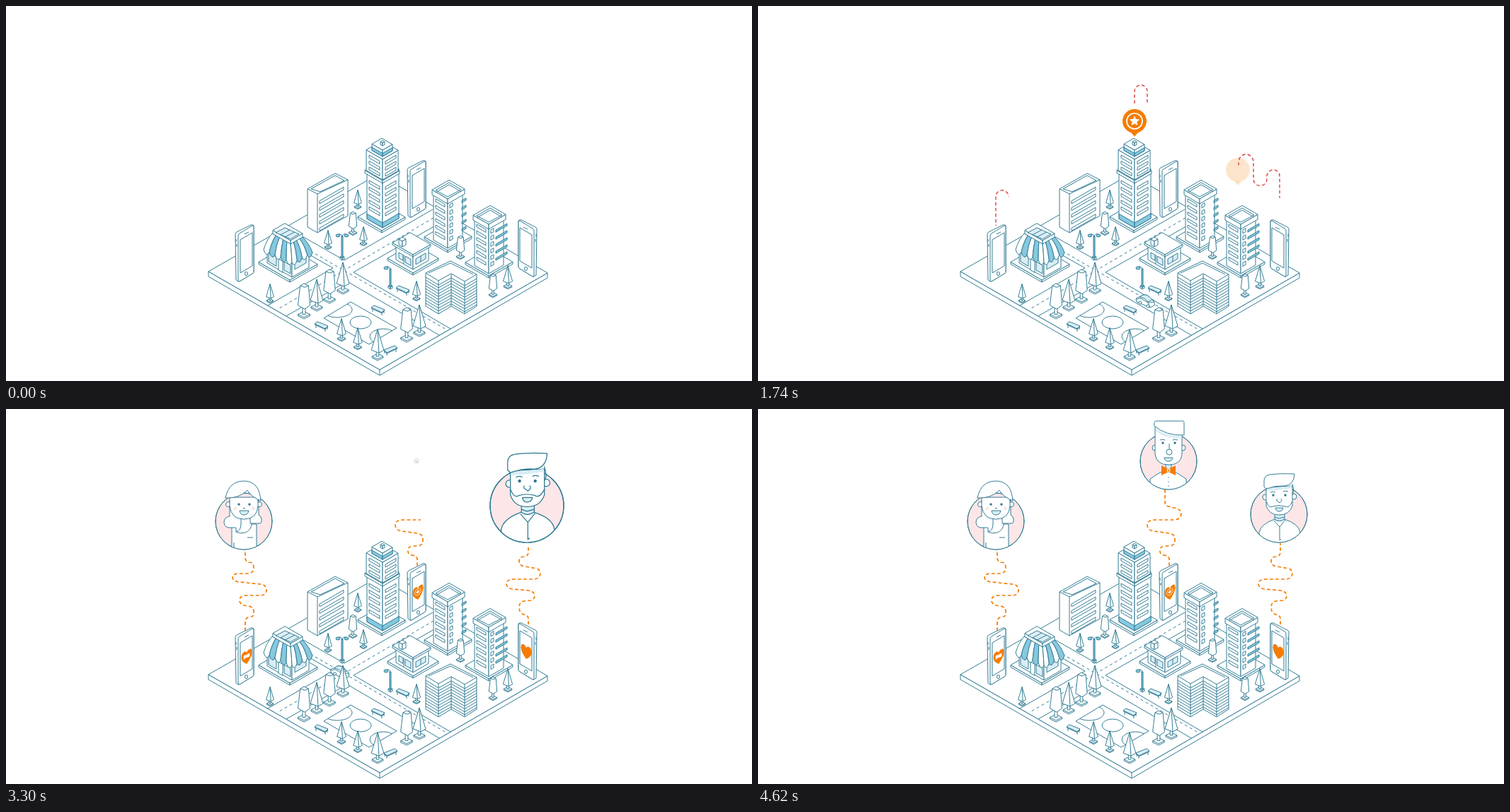
An HTML page with a canvas that plays this animation: 1054x531 px, repeating every 4680 ms.

```html
<!DOCTYPE html>
<html lang="en">
<head>
<meta charset="utf-8">
<title>Isometric city</title>
<style>
html, body { margin: 0; width: 100%; height: 100%; overflow: hidden; background: #fff; }
canvas { display: block; }
</style>
</head>
<body>
<canvas id="stage" width="1054" height="531"></canvas>
<script>
const ctx = document.getElementById('stage').getContext('2d');
const LOOP = 4680, K = 0.577, THIN = 0.95;
const INK = '#2b7890', BLUE = '#86c8de', PALE = '#d9edf5', PINK = '#fde6e7';
const ORANGE = '#f57c00', RED = '#d8433f';

// ---------- drawing helpers ----------
function trace(pts) {
  ctx.beginPath();
  for (let i = 0; i < pts.length; i += 2) ctx.lineTo(pts[i], pts[i + 1]);
}
function poly(pts, fill = '#fff') {
  trace(pts);
  ctx.closePath();
  ctx.fillStyle = fill;
  ctx.fill();
  ctx.stroke();
}
function line(...pts) { trace(pts); ctx.stroke(); }
function shape(d, fill, stroke = true) {
  const p = new Path2D(d);
  if (fill) { ctx.fillStyle = fill; ctx.fill(p); }
  if (stroke) ctx.stroke(p);
}
function disc(x, y, rx, fill, stroke = true, ry = rx) {
  ctx.beginPath();
  ctx.ellipse(x, y, rx, ry, 0, 0, 7);
  if (fill) { ctx.fillStyle = fill; ctx.fill(); }
  if (stroke) ctx.stroke();
}
// Box standing on its front corner, l to the left and r to the right.
function slab(x, y, l, r, h, fill) {
  const t = y - h;
  poly([x, y, x - l, y - l * K, x - l, t - l * K, x, t], fill);
  poly([x, y, x + r, y - r * K, x + r, t - r * K, x, t], fill);
  poly([x, t, x - l, t - l * K, x - l + r, t - (l + r) * K, x + r, t - r * K]);
}
function strip(x, y, w, h, k, fill) {
  poly([x, y, x + w, y + w * k, x + w, y + w * k + h, x, y + h], fill);
}
function rows(n, step, x, y, w, h, k, fill) {
  for (let i = 0; i < n; i++) strip(x, y + i * step, w, h, k, fill);
}
function at(x, y, s, draw) {
  ctx.save();
  ctx.translate(x, y);
  ctx.scale(s, s);
  draw();
  ctx.restore();
}

// ---------- ground ----------
function ground() {
  poly([286, 376, 528, 515, 765, 378, 765, 385, 528, 523, 286, 383]);
  poly([286, 376, 526, 238, 765, 378, 528, 515]);
  line(528, 515, 528, 523);
  line(420, 327, 478, 360, 603, 288);
  line(605, 312, 491, 377, 628, 457);
  line(370, 424, 462, 371, 425, 350);
  line(396, 439, 482, 390, 612, 466);
  ctx.setLineDash([4, 4]);
  line(604, 300, 383, 430);
  line(430, 347, 620, 457);
  ctx.setLineDash([]);

  const court = [449, 442, 487, 419, 552, 456, 513, 479];
  poly(court);
  disc(501, 448, 15, null, true, 9);
  ctx.save();
  trace(court);
  ctx.clip();
  disc(468, 430, 21, null, true, 11);
  disc(533, 468, 19, null, true, 11);
  ctx.restore();
}

function car(t) {
  ctx.save();
  ctx.globalAlpha = Math.min(1, t / 300);
  ctx.translate(547 - 0.0484 * (t - 1740), 418 - 0.0289 * (t - 1740));
  shape('M-13 -3Q-12 -6 -8 -6L-3 -9Q1 -10 5 -7L10 -2L13 1V6L7 9L-12 1Z', '#fff');
  shape('M-8 -6L-3 -9Q1 -10 5 -7L10 -2L4 1L-1 -4Z', PALE);
  line(-13, -3, -6, -4, 4, 2, 7, 9);
  line(4, 2, 13, 1);
  disc(-7, 2, 2, '#fff');
  disc(4, 7, 2, '#fff');
  ctx.restore();
}

// ---------- buildings ----------
function office() {
  poly([426, 259, 465, 237, 483, 246, 483, 297, 440, 321, 426, 313]);
  line(426, 259, 440, 266, 483, 246);
  line(440, 266, 440, 321);
  poly([431, 259, 465, 240, 478, 247, 444, 263]);
  rows(5, 9.6, 443, 276, 34, 4, -K);
}

function tower() {
  slab(531, 321, 34, 33, 3);
  slab(532, 314, 22, 23, 70);
  strip(510, 294.3, 22, 7, K, BLUE);
  strip(532, 307, 23, 7, -K, BLUE);
  rows(5, 9.3, 513, 247, 15, 4, K);
  rows(5, 9.3, 536, 256, 15, 4, -K);
  slab(532, 251, 25, 24, 4);
  slab(532, 246, 23, 22, 29);
  rows(3, 8.5, 513, 211, 15, 4, K);
  rows(3, 8.5, 536, 220, 15, 4, -K);
  slab(532, 213, 15, 14, 9);
  strip(517, 200, 15, 4.5, K, BLUE);
  strip(532, 208.6, 14, 4.5, -K, BLUE);
  slab(532, 198, 3, 3, 4);
}

function flats(x, y, inset, wide) {
  slab(x, y + 6, 33, 34, 3);
  slab(x, y, 20, 21, 66);
  rows(6, 9.3, x - 17, y - 70, 13, 4, K);
  rows(6, 9.3, x + 3, y - 62, 4, 5, -K);
  for (let i = 0; i < 5; i++) {
    strip(x + inset, y - 56 - inset * K + i * 10, wide, 3, -K, BLUE);
  }
  slab(x, y - 63, 22, 24, 7);
  poly([x - 17, y - 82, x + 2, y - 93, x + 19, y - 83, x, y - 73]);
  line(x - 17, y - 79, x + 2, y - 90, x + 19, y - 80);
}

function corner() {
  const top = [593, 378, 611, 389, 629, 379, 648, 390, 665, 380];
  poly([593, 378, 628, 361, 665, 380, 665, 425, 648, 436, 629, 425, 611, 436, 593, 425]);
  line(...top);
  line(597, 378, 628, 364, 660, 380);
  for (let i = 0; i < 5; i++) {
    for (const d of [6, 10]) line(...top.map((v, j) => j % 2 ? v + i * 8.2 + d : v));
  }
  line(611, 389, 611, 436);
  line(629, 379, 629, 425);
  line(648, 390, 648, 436);
}

function house() {
  slab(575, 381, 36, 36, 3);
  slab(575, 373, 24, 22, 20);
  strip(555, 349, 6, 8, K, PALE);
  strip(564, 354, 8, 9, K, PALE);
  strip(579, 358, 14, 8, -K, PALE);
  line(562, 352, 562, 365);
  line(586, 354, 586, 362);
  slab(575, 355, 29, 25, 3);
  slab(560, 341, 5, 5, 8);
}

// Striped cloth from the edge a-b down to the wider edge c-d.
function awning(n, a, b, c, d) {
  const mix = (p, q, u) => [p[0] + (q[0] - p[0]) * u, p[1] + (q[1] - p[1]) * u];
  const bend = (p, q) => [p[0] + (q[0] - p[0]) * 0.65, p[1] + (q[1] - p[1]) * 0.4];
  for (let i = 0; i < n; i++) {
    const p = mix(a, b, i / n), q = mix(a, b, (i + 1) / n);
    const r = mix(c, d, i / n), s = mix(c, d, (i + 1) / n);
    const low = mix(r, s, 0.5);
    shape(`M${p}L${q}Q${bend(q, s)} ${s}Q${low[0]} ${low[1] + 10} ${r}Q${bend(p, r)} ${p}Z`,
      i % 2 ? BLUE : '#fff');
  }
}
function shop() {
  slab(401, 391, 44, 39, 3);
  slab(404, 384, 35, 24, 26);
  strip(371, 349, 11, 13, K, PALE);
  strip(385, 358, 6, 16, K);
  strip(393, 362, 9, 12, K, PALE);
  strip(408, 364, 16, 9, -K, PALE);
  awning(5, [376, 322], [402, 336], [364, 345], [404, 363]);
  awning(4, [402, 336], [419, 327], [404, 363], [433, 349]);
  slab(402, 337, 25, 17, 5);
  poly([381, 321, 394, 314, 414, 323, 402, 330], PALE);
  line(388, 324, 401, 317);
  line(394, 327, 408, 320);
}

// ---------- small things ----------
function tree(x, y, h, round) {
  const s = h / 45;
  at(x, y, s, () => {
    ctx.lineWidth = THIN / s;
    poly([-8, -5, 0, -9, 8, -5, 8, -3, 0, 1, -8, -3]);
    line(-8, -5, 0, -1, 8, -5);
    poly([-1.8, -14, 1.8, -14, 1.8, -5, -1.8, -5]);
    if (round) {
      poly([-5, -43, 0, -46, 6, -43, 8, -17, 1, -12, -8, -17]);
      line(-5, -43, 1, -41, 6, -43);
    } else {
      poly([0, -44, 9, -14, 2, -10, -9, -14]);
      line(0, -44, 2, -10);
    }
  });
}
function bench(x, y) {
  at(x, y, 1, () => {
    line(-7, -1, -7, 3);
    line(6, 4, 6, 8);
    line(9, 1, 9, 5);
    poly([-9, -3, -5, -6, 10, 0, 6, 4], PALE);
    line(-9, -2, 6, 5, 10, 1);
  });
}
function lamp(x, y, h, double) {
  const top = y - h;
  slab(x, y, 3, 3, 3);
  poly([x - 1, y - 3, x - 1, top + 4, x + 1, top + 4, x + 1, y - 3], BLUE);
  const head = s => {
    shape(`M${x} ${top + 5}Q${x + s} ${top} ${x + 5 * s} ${top + 1}`);
    disc(x + 6 * s, top + 3, 3, BLUE, true, 2);
  };
  head(-1);
  if (double) head(1);
}
function phone(x, y, flip) {
  ctx.save();
  ctx.translate(x, y);
  ctx.scale(flip ? -1 : 1, 1);
  shape('M-16 -27Q-16 -29 -14 -30L6 -40Q8 -41 10 -39V26Q10 28 8 29L-10 40Q-12 41 -15 38Z', '#fff');
  shape('M-12 -25Q-12 -27 -10 -28L8 -39Q10 -40 10 -37V26Q10 28 8 29L-10 40Q-12 41 -12 38Z', '#fff');
  poly([-9, -19, 8, -29, 8, 18, -9, 28]);
  line(-3, -27, 3, -30);
  disc(-0.5, 29, 2, null, true, 2.7);
  line(-15, -20, -15, -16);
  line(-14, -13, -14, -9);
  ctx.restore();
}

const ROUND = [[490, 324, 32], [642, 358, 32], [457, 420, 46], [421, 442, 48],
  [688, 412, 32], [566, 475, 47]];
const CONES = [[497, 287, 27], [505, 339, 27], [455, 344, 27], [476, 407, 45], [439, 431, 45],
  [373, 420, 27], [580, 417, 28], [709, 400, 33], [474, 474, 32], [497, 486, 31],
  [584, 467, 45], [525, 501, 44]];

function city() {
  office();
  tower();
  phone(583, 259);
  flats(624, 343, 20, 6);
  flats(682, 379, 10, 16);
  phone(734, 343, true);
  phone(340, 350);
  shop();
  house();
  corner();
  lamp(475, 360, 38, true);
  lamp(543, 401, 33, false);
  bench(560, 402);
  bench(525, 430);
  bench(445, 453);
  for (const [x, y, h] of ROUND) tree(x, y, h, true);
  for (const [x, y, h] of CONES) tree(x, y, h, false);
  ctx.save();
  ctx.translate(544, 487);
  ctx.scale(-1, 1);
  bench(0, 0);
  ctx.restore();
}

// ---------- icons ----------
function ticket() {
  shape('M-11 -6H-2Q0 -3 2 -6H11V-2Q9 0 11 2V6H2Q0 3 -2 6H-11V2Q-9 0 -11 -2Z', '#fff', false);
  ctx.strokeStyle = ORANGE;
  ctx.setLineDash([2, 1.5]);
  line(-4, -6, -4, 6);
  ctx.setLineDash([]);
}
function badge() {
  ctx.strokeStyle = '#fff';
  ctx.lineWidth = 1.7;
  disc(0, 0, 11);
  ctx.beginPath();
  for (let i = 0; i < 10; i++) {
    const r = i % 2 ? 3.6 : 7.6, a = i * Math.PI / 5;
    ctx.lineTo(r * Math.sin(a), -r * Math.cos(a));
  }
  ctx.fillStyle = '#fff';
  ctx.fill();
}
const blank = () => {};

// ---------- avatars ----------
function eyes(x, y) {
  disc(-x, y, 1.7, INK, false);
  disc(x + 1, y, 1.7, INK, false);
}
function bust(body, head) {
  disc(0, 0, 40, PINK);
  ctx.save();
  ctx.beginPath();
  ctx.arc(0, 0, 40, 0, 7);
  ctx.clip();
  body();
  ctx.restore();
  disc(0, 0, 40);
  head();
}
function woman() {
  bust(() => {
    shape('M-17 44V4H18V44Z', '#fff');
    line(-14, 30, -14, 40);
    line(5, 23, 13, 23);
  }, () => {
    shape('M-11 15Q-5 18 2 16Q10 13 11 4L8 -8H-10', '#fff');
    shape('M-20 -30V-7Q-28 -6 -28 2Q-27 10 -18 9H-11V15Q-4 13 -4 4V-8Z', '#fff');
    shape('M9 -8V3H23Q26 2 25 -3Q25 -7 21 -9V-30Z', '#fff');
    disc(-22, -24, 3.5, '#fff');
    disc(22, -24, 3.5, '#fff');
    shape('M-20 -34V-22Q-18 -3 0 -3Q19 -3 20 -22V-34Z', '#fff');
    shape('M-26 -33Q-21 -57 0 -57Q22 -57 24 -29Q10 -35 5 -44Q-7 -32 -26 -33Z', '#fff');
    eyes(7, -24);
    disc(-12, -18, 2.5, PINK, false);
    disc(13, -18, 2.5, PINK, false);
    line(-1, -18.5, 2, -18.5);
    shape('M-6 -15H7Q6 -9 0 -9Q-5 -9 -6 -15Z', PALE);
  });
}
function bearded() {
  bust(() => {
    shape('M-28 44V26Q-26 14 -6 7Q0 12 7 7Q28 13 30 26V44Z', '#fff');
    line(-7, 9, 1, 18, 9, 8);
    line(1, 18, 1, 37, 3, 35);
  }, () => {
    shape('M-6 -2V7Q0 12 8 7V-2Z', PALE);
    line(-6, 4, 0, 6, 8, 4);
    disc(-19, -24, 4, '#fff');
    disc(21, -25, 4, '#fff');
    shape('M-18 -38V-12Q-14 1 0 1Q15 1 19 -12V-40Z', '#fff');
    shape('M-17 -37Q0 -38 18 -40V-37Q0 -34 -17 -33Z', PALE, false);
    shape('M-18 -18Q-14 -8 -9 -11Q0 -14 9 -11Q14 -8 19 -18');
    shape('M-21 -39V-47Q-21 -55 -13 -56Q0 -58 22 -57Q21 -41 8 -40Q-4 -41 -18 -36Z', '#fff');
    line(19, -43, 21, -33, 19, -27);
    eyes(8, -27);
    shape('M-12 -31Q-8 -33 -5 -31M6 -32Q9 -34 13 -32');
    shape('M-3 -22Q-4 -18 -1 -18L1 -16L3 -18Q5 -19 3 -22');
    shape('M-5 -9H6Q5 -4 0 -4Q-4 -4 -5 -9Z', PALE);
  });
}
function dapper() {
  bust(() => {
    shape('M-26 44V25Q-12 15 -4 13H4Q14 17 25 25V44Z', '#fff');
    for (const y of [23, 29, 35]) disc(0, y, 0.7, INK, false);
  }, () => {
    shape('M-4 2V15H4V2Z', PALE);
    disc(-19, -19, 4, '#fff');
    disc(20, -19, 4, '#fff');
    shape('M-19 -52V-10Q-17 5 0 5Q18 5 19 -10V-44Z', '#fff');
    shape('M-18 -46Q-4 -35 19 -36V-33Q-6 -32 -18 -43Z', PALE, false);
    shape('M-20 -52Q-21 -57 -17 -57H19Q22 -58 22 -54V-37Q-4 -36 -20 -50Z', '#fff');
    eyes(8, -26);
    shape('M-12 -30Q-8 -32 -5 -30M6 -30Q9 -32 13 -30');
    line(1, -25, 1, -17);
    disc(1, -13, 4, '#fff');
    shape('M-6 -5H6Q5 0 0 0Q-5 0 -6 -5Z', PALE);
    shape('M0 11L-10 6V20L0 15L10 20V6Z', ORANGE, false);
    disc(0, 13, 2.5, '#fff', false);
    disc(0, 13, 1.5, ORANGE, false);
  });
}

// ---------- motion ----------
const clamp = v => Math.max(0, Math.min(1, v));
const easeOut = v => 1 - Math.pow(1 - clamp(v), 1.8);
function pop(d) {
  if (d <= 0) return 0;
  if (d < 300) return 1.3 * (1 - Math.pow(1 - d / 300, 3.2));
  const p = clamp((d - 300) / 200);
  return 1.3 - 0.3 * p * p * (3 - 2 * p);
}

function route(d) {
  const el = document.createElementNS('http://www.w3.org/2000/svg', 'path');
  el.setAttribute('d', d);
  return { path: new Path2D(d), len: el.getTotalLength() };
}
// Strokes the part of a dashed route between the fractions a and b.
function trail({ path, len }, a, b, color, width) {
  if (b <= a) return;
  const dash = [0];
  let pos = 0;
  for (let s = 0; s < len; s += 8) {
    const lo = Math.max(s, a * len), hi = Math.min(s + 4.8, b * len);
    if (hi <= lo) continue;
    dash.push(lo - pos, hi - lo);
    pos = hi;
  }
  if (dash.length < 2) return;
  dash.push(len * 2);
  ctx.save();
  ctx.strokeStyle = color;
  ctx.lineWidth = width;
  ctx.setLineDash(dash);
  ctx.stroke(path);
  ctx.restore();
}

const OFFERS = [
  { tip: [394, 312], heart: [340, 350], born: 330, go: 1000, icon: ticket,
    way: route('M395 268V254A14 15 0 0 0 367 254V272A6.5 7 0 0 1 354 272V270A9 9 0 0 0 336 270V311') },
  { tip: [678, 282], heart: [735, 343], born: 460, go: 1300, icon: blank, flip: true,
    way: route('M679 234V221A10.5 11 0 0 1 700 221V245A9.5 9.5 0 0 0 719 245V241A9 9 0 0 1 737 241V304') },
  { tip: [532, 185], heart: [582, 259], born: 590, go: 1600, icon: badge,
    way: route('M532 138V121A9 9 0 0 1 550 121V150A7.5 7.5 0 0 0 565 150A7.5 7.5 0 0 1 580 150V221') }
];
const PEOPLE = [
  { x: 336, y: 159, base: 40, go: 2345, born: 2700, draw: woman,
    way: route('M338 314V302Q338 295 344 295Q351 294 350 287Q350 280 342 279Q330 278 330 271' +
      'Q330 265 338 264H359Q368 264 368 256Q368 249 359 248L330 245Q320 244 320 238' +
      'Q321 233 329 233H343Q350 232 350 225Q350 217 344 217Q338 216 338 211V199') },
  { x: 736, y: 149, base: 40, go: 2690, born: 3000, draw: bearded,
    way: route('M738 305V297Q738 292 732 291Q725 289 725 281Q725 273 732 272L741 271Q747 270 747 264' +
      'Q746 258 738 257L716 255Q707 254 707 247Q708 241 717 241H746Q755 240 755 232' +
      'Q754 226 745 225L733 223Q725 222 725 215Q726 209 732 209Q738 208 738 203V190') },
  { x: 580, y: 74, base: 0, go: 2970, born: 3294, draw: dapper,
    way: route('M581 222V213Q581 208 574 207Q567 206 568 200Q568 194 576 194H582Q589 193 589 185' +
      'Q589 177 581 176L560 173Q550 172 550 164Q551 157 560 157H588Q598 156 598 148' +
      'Q597 141 588 140L580 138Q575 137 575 131V113') }
];

function offer(o, t) {
  const d = t - o.go, leave = clamp((d - 280) / 200);
  const size = pop(t - o.born);
  if (size && leave < 1) {
    ctx.save();
    ctx.globalAlpha = 1 - leave;
    at(o.tip[0], o.tip[1] - 35 * leave, size, () => {
      shape('M0 0L-5 -6H5Z', ORANGE, false);
      disc(0, -22, 17, ORANGE, false);
      ctx.translate(0, -22);
      o.icon();
    });
    ctx.restore();
  }
  trail(o.way, easeOut((d - 420) / 820), easeOut(d / 700), RED, 1.4);
  const beat = pop(d - 745);
  if (beat) {
    at(o.heart[0], o.heart[1], beat, () => {
      ctx.transform(1, o.flip ? 0.5 : -0.5, 0, 1, 0, 0);
      shape('M0 11Q-8 4 -7.5 -2Q-7 -8 -3.5 -8Q-1 -8 0 -5Q1 -8 4 -8Q7.5 -8 7.5 -2Q8 4 0 11Z', ORANGE, false);
      ctx.scale(0.4, 0.4);
      o.icon();
    });
  }
}

function person(p, t) {
  trail(p.way, 0, easeOut((t - p.go) / 700), ORANGE, 1.7);
  const size = pop(t - p.born);
  if (size) {
    at(p.x, p.y + p.base, size, () => {
      ctx.translate(0, -p.base);
      p.draw();
    });
  }
}

function frame(now) {
  const t = Math.floor(now % LOOP / 30) * 30;
  ctx.fillStyle = '#fff';
  ctx.fillRect(0, 0, 1054, 531);
  ctx.strokeStyle = INK;
  ctx.lineWidth = THIN;
  ctx.lineJoin = 'round';
  ground();
  car(t);
  city();
  for (const o of OFFERS) offer(o, t);
  for (const p of PEOPLE) person(p, t);
}

const start = performance.now();
function tick() {
  frame(performance.now() - start);
  requestAnimationFrame(tick);
}
tick();
</script>
</body>
</html>
```
